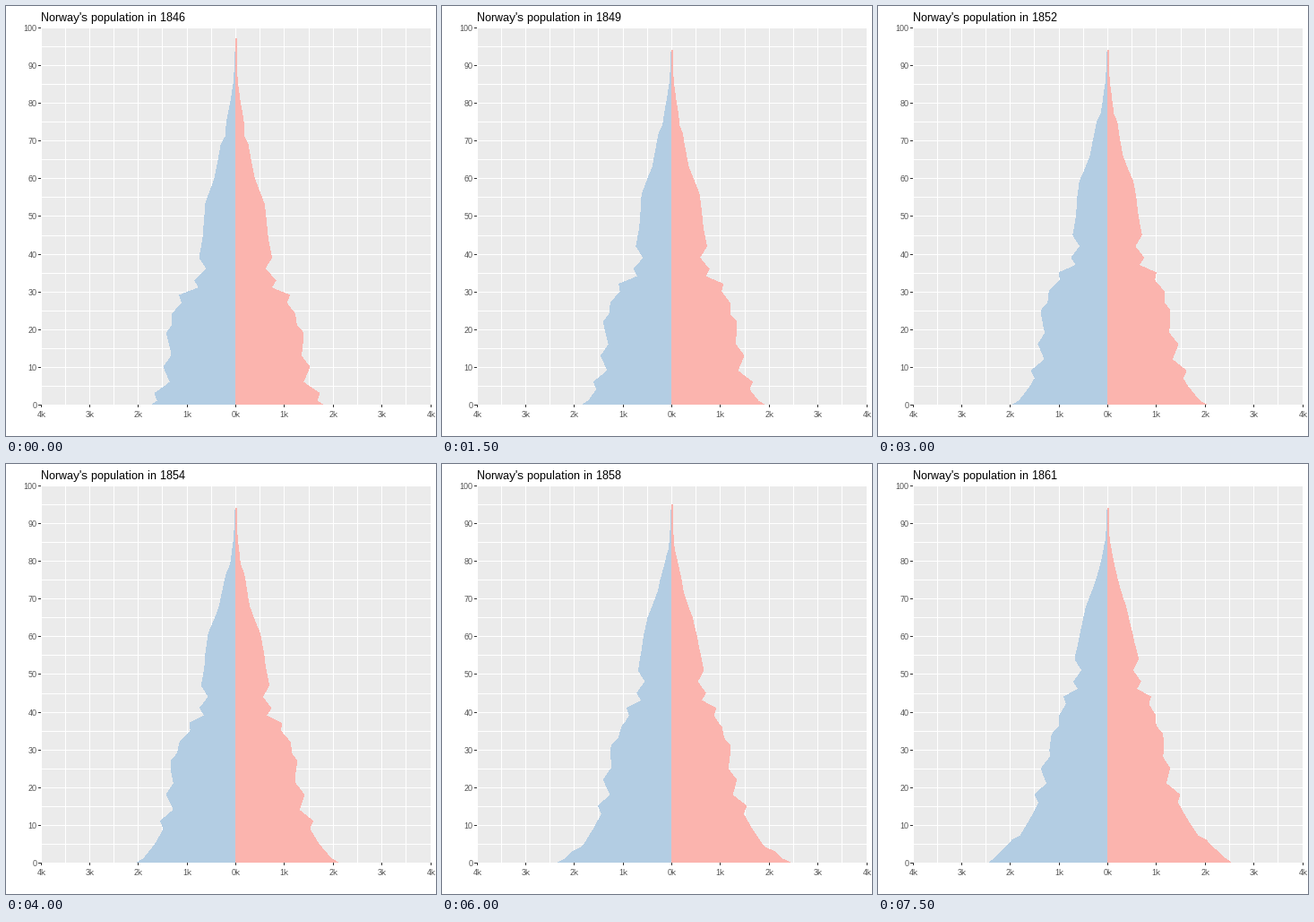
Recreate the animation shown at these times as a matplotlib script. Size 480 by 480 pixels, loop 8000 ms.

```python
import numpy as np
import matplotlib.pyplot as plt
from matplotlib.animation import FuncAnimation
from matplotlib.patches import Polygon, Rectangle

START, END = 1846, 1861
SIZE, DPI = 480, 100
PT = 72 / DPI
LEFT, RIGHT, TOP, BOTTOM = 39, 474, 24, 445
MID = 256.4

plt.rcParams.update({"text.hinting": "native", "text.hinting_factor": 1})

# Good and bad birth years: (year, births in pixels of bar width)
BIRTHS = [
    (1770, 38), (1775, 34), (1777, 44), (1786, 47), (1793, 62), (1802, 63),
    (1807, 67), (1810, 52), (1813, 67), (1815, 57), (1817, 84), (1819, 78),
    (1822, 89), (1825, 87), (1827, 94), (1833, 85), (1836, 94), (1840, 83),
    (1843, 99), (1845, 93), (1849, 101), (1854, 112), (1855, 121), (1860, 135)]

# (age, share of a birth year still living)
SURVIVAL = [
    (0, 1), (1, .955), (5, .9), (10, .865), (20, .805), (30, .72), (37, .61),
    (44, .575), (55, .52), (60, .47), (75, .25), (80, .14), (85, .06), (90, .02), (97, 0)]

# (age, surplus of women)
SURPLUS = [(0, .02), (15, .01), (24, -.035), (36, 0), (50, -.015), (70, -.09), (80, -.05)]

OLDEST = [(1846, 97), (1849, 94), (1854, 94), (1856, 96), (1861, 94)]


def curve(points, x):
    return np.interp(x, *zip(*points))


def age_y(age):
    return BOTTOM - (BOTTOM - TOP) * age / 100


def outline(year, side):
    """Follow every cohort: births times survival, side -1 men, +1 women."""
    ages = np.arange(round(curve(OLDEST, year)) + 1)
    living = curve(BIRTHS, year - ages) * curve(SURVIVAL, ages)
    widths = living * (1 + side * curve(SURPLUS, ages))
    if side > 0:
        widths = np.maximum(widths, 0.9)
    edge = np.column_stack([MID + side * widths, age_y(ages)])
    return np.vstack([edge, [MID, age_y(ages[-1])], [MID, BOTTOM]])


fig = plt.figure(figsize=(SIZE / DPI, SIZE / DPI), dpi=DPI, facecolor="white")
ax = fig.add_axes([0, 0, 1, 1])
ax.set(xlim=(0, SIZE), ylim=(SIZE, 0))
ax.axis("off")


def line(x, y, color, z):
    ax.plot(x, y, color=color, lw=PT, zorder=z, solid_capstyle="butt", snap=False)


def label(x, y, text, align):
    ax.text(x, y, text, family="Liberation Sans", fontsize=9 * PT,
            color="#4D4D4D", ha=align, va="baseline")


ax.add_patch(Rectangle((LEFT, TOP), RIGHT - LEFT, BOTTOM - TOP,
                       fc="#EBEBEB", lw=0, zorder=0))

for i in range(17):
    x = int(LEFT + (RIGHT - LEFT) * i / 16) + 0.5
    line([x, x], [TOP, BOTTOM], "white", 1)
    if i % 2 == 0:
        line([x, x], [BOTTOM, BOTTOM + 3], "#333333", 4)
        label(x, 459, f"{abs(i // 2 - 4)}k", "center")

for age in range(0, 101, 5):
    y = round(age_y(age)) + 0.5
    line([LEFT, RIGHT], [y, y], "white", 1)
    if age % 10 == 0:
        line([LEFT - 3, LEFT], [y, y], "#333333", 4)
        label(34.8, y + 3.4, str(age), "right")

blue = ax.add_patch(Polygon([[0, 0]], fc="#B3CDE3", lw=0, aa=False, zorder=2))
pink = ax.add_patch(Polygon([[0, 0]], fc="#FBB4AE", lw=0, aa=False, zorder=3))
title = ax.text(39, 17, "", family="Liberation Sans", fontsize=13 * PT, color="black")


def update(i):
    year = START + i
    blue.set_xy(outline(year, -1))
    pink.set_xy(outline(year, 1))
    title.set_text(f"Norway's population in {year}")
    return blue, pink, title


anim = FuncAnimation(fig, update, frames=END - START + 1, interval=500,
                     repeat=True, repeat_delay=0)
plt.show()
```
